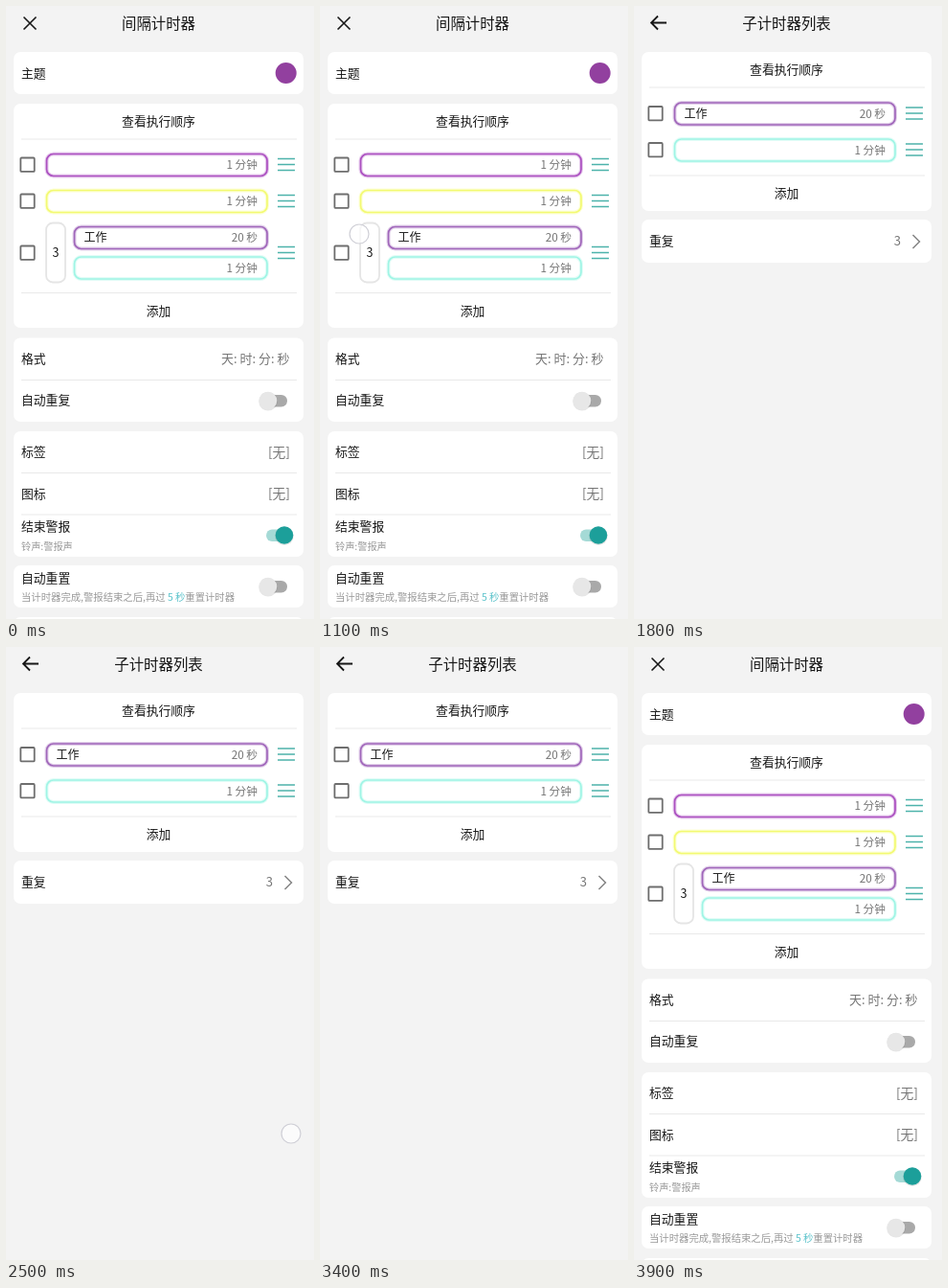
An HTML page that plays this animation: 322 px wide and 640 px high, repeating every 4000 ms.

```html
<!DOCTYPE html>
<html lang="zh-CN">
<head>
<meta charset="utf-8">
<style>
html, body { margin: 0; width: 100%; height: 100%; overflow: hidden; background: #f3f3f3; }
svg { display: block; width: 322px; height: 640px; font-family: "Noto Sans CJK SC", "Noto Sans CJK", "Noto Sans", sans-serif; }
#main, #sub, #touch, #hint, #main > g, #sub > g { animation: 4s step-end infinite; }
#main { animation-name: main; }
#sub { animation-name: sub; }
#main > g { animation-name: mainFade; }
#sub > g { animation-name: subFade; }
#touch { animation-name: touch; }
#hint { animation-name: hint; }
@keyframes main {
  0% { opacity: 1; transform: none; }
  30% { opacity: 0; transform: none; }
  87.5% { opacity: 1; transform: translateX(-11px); }
  90% { opacity: 1; transform: translateX(-1.5px); }
  92.5% { opacity: 1; transform: translateX(-.4px); }
  95%, 100% { opacity: 1; transform: none; }
}
@keyframes sub {
  0% { opacity: 0; transform: none; }
  30% { opacity: 1; transform: translateX(11px); }
  32.5% { opacity: 1; transform: translateX(1.5px); }
  35% { opacity: 1; transform: translateX(.4px); }
  37.5% { opacity: 1; transform: none; }
  87.5%, 100% { opacity: 0; transform: none; }
}
@keyframes mainFade { 0%, 90%, 100% { opacity: 1; } 87.5% { opacity: .48; } }
@keyframes subFade { 0%, 32.5%, 100% { opacity: 1; } 30% { opacity: .48; } }
@keyframes touch {
  0% { opacity: 0; transform: translate(41px, 238px); }
  25% { opacity: 1; transform: translate(41px, 238px); }
  30% { opacity: 0; transform: translate(304px, 508px); }
  57.5% { opacity: 1; transform: translate(304px, 508px); }
  60% { opacity: 1; transform: translate(302px, 508px); }
  62.5% { opacity: 1; transform: translate(298px, 508px); }
  65% { opacity: 1; transform: translate(293px, 508px); }
  67.5% { opacity: 1; transform: translate(285px, 508px); }
  70% { opacity: 1; transform: translate(278px, 508px); }
  72.5% { opacity: 1; transform: translate(275px, 508px); }
  77.5%, 100% { opacity: 0; transform: translate(275px, 508px); }
}
@keyframes hint {
  0% { opacity: 0; transform: translateX(6px); }
  65% { opacity: .3; transform: translateX(4px); }
  67.5% { opacity: .7; transform: translateX(2px); }
  70% { opacity: 1; transform: translateX(.5px); }
  72.5% { opacity: 1; transform: none; }
  77.5% { opacity: .5; transform: none; }
  80%, 100% { opacity: 0; transform: none; }
}
</style>
</head>
<body>
<svg viewBox="0 0 322 640">
  <g id="main"></g>
  <g id="sub"></g>
  <path id="hint" d="M299 454.5L289 463L299 471.5" fill="none" stroke="#adadad" stroke-width="2.2"/>
  <circle id="touch" r="10" fill="#fff" fill-opacity=".65" stroke="#cfcfd6" stroke-width="1.2"/>
</svg>
<script>
const INK = '#171717', GREY = '#757575', TEAL = '#4db3ab';
const PURPLE = '#ab4fc0', VIOLET = '#a066ba', YELLOW = '#f3fa72', AQUA = '#9ff5e5';

const text = (s, x, y, size = 12.8, fill = INK, anchor = 'start') =>
  `<text x="${x}" y="${y}" dy=".345em" font-size="${size}" fill="${fill}" text-anchor="${anchor}">${s}</text>`;
const middle = (s, y, size) => text(s, 159.5, y, size, INK, 'middle');
const value = (s, y, x = 296.5, size = 13) => text(s, x, y, size, GREY, 'end');
const line = (d, color, width) =>
  `<path d="${d}" fill="none" stroke="${color}" stroke-width="${width}"/>`;
const card = ([top, bottom]) =>
  `<rect x="8" y="${top}" width="303" height="${bottom - top}" rx="7" fill="#fff"/>`;
const rule = y => line(`M16 ${y}H304`, '#e9e9e9', 1);

const box = (x, y, w, h, color, width, extra = '') =>
  `<rect x="${x}" y="${y}" width="${w}" height="${h}" rx="7" fill="none" stroke="${color}" stroke-width="${width}" ${extra}/>`;
const bar = (x, y, color, time, name = '') =>
  box(x, y - 11, 273 - x, 23, color, 4, 'opacity=".3"') +
  box(x, y - 11, 273 - x, 23, color, 1.7) +
  text(name, x + 10, y + .5, 12) + text(time, 263, y + .5, 11.7, GREY, 'end');
const handles = y =>
  `<rect x="15.3" y="${y - 7}" width="14.4" height="14.4" rx="1" fill="none" stroke="#6e6e6e" stroke-width="1.8"/>` +
  line(`M284 ${y - 6}h18m-18 6h18m-18 6h18`, TEAL, 1.7);

const toggle = (trackX, thumbX, y, track, thumb) =>
  `<rect x="${trackX}" y="${y - 6}" width="28" height="12.5" rx="6.2" fill="${track}"/>
   <circle cx="${thumbX}" cy="${y + .7}" r="9.8" fill="#000" opacity=".1"/>
   <circle cx="${thumbX}" cy="${y}" r="9.3" fill="${thumb}"/>`;
const off = y => toggle(266, 274, y, '#a9a9a9', '#e7e7e7');

// Cards stay solid while the content on them fades.
const page = (id, cards, content) => {
  document.getElementById(id).innerHTML =
    cards.map(card).join('') + `<g>${content.join('')}</g>`;
};

page('main', [[48, 92], [102, 336], [346.5, 434], [444, 575], [584, 628], [638, 660]], [
  line('M18.5 11.5l13 13m0-13l-13 13', INK, 1.6),
  middle('间隔计时器', 18.5, 15.4),
  text('主题', 16, 71),
  '<circle cx="292.7" cy="70" r="11" fill="#92409f"/>',

  middle('查看执行顺序', 120.5), rule(139),
  handles(165.5), bar(42.5, 165.5, PURPLE, '1 分钟'),
  handles(203.5), bar(42.5, 203.5, YELLOW, '1 分钟'),
  handles(257.5), box(42, 226.5, 20, 62, '#e5e5e5', 1.8),
  text('3', 52, 257.5, 12.5, INK, 'middle'),
  bar(71.5, 241.5, VIOLET, '20 秒', '工作'),
  bar(71.5, 273, AQUA, '1 分钟'),
  rule(299.5), middle('添加', 318.5),

  text('格式', 16, 369), value('天: 时: 分: 秒', 369),
  rule(390.5), text('自动重复', 16, 412), off(412),

  text('标签', 16, 466), value('[无]', 466, 297, 13.8),
  rule(487.5), text('图标', 16, 509.5), value('[无]', 509.5, 297, 13.8),
  rule(531), text('结束警报', 16, 544), text('铃声:警报声', 16, 564, 10.2, '#999'),
  toggle(272, 291, 552.5, '#a5dad6', '#1c9f9a'),

  text('自动重置', 16, 597.5), off(606),
  text('当计时器完成,警报结束之后,再过 <tspan fill="#5cc3cb">5 秒</tspan>重置计时器', 16, 617.5, 10.35, '#999')
]);

page('sub', [[48, 214], [223, 268]], [
  line('M34 17.5H18M25 10.5l-7 7l7 7', INK, 1.8),
  middle('子计时器列表', 18.5, 15.4),
  middle('查看执行顺序', 67), rule(85),
  handles(112), bar(42.5, 112, VIOLET, '20 秒', '工作'),
  handles(150), bar(42.5, 150, AQUA, '1 分钟'),
  rule(177), middle('添加', 196),
  text('重复', 16, 246), value('3', 246, 279),
  line('M291.5 239l7 7l-7 7', '#858585', 1.5)
]);
</script>
</body>
</html>
```
